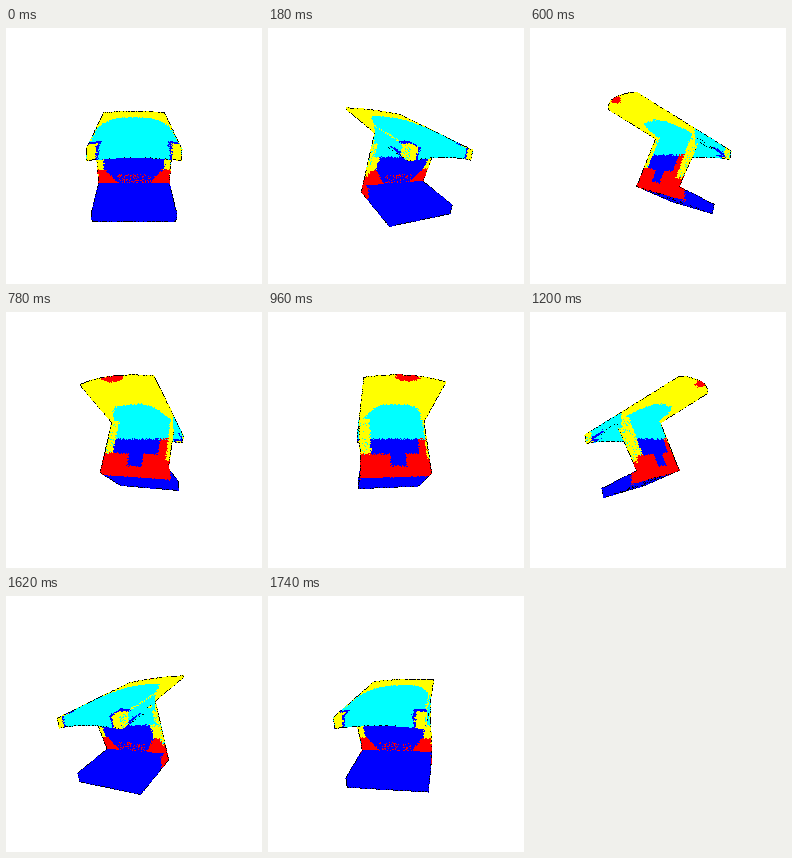
These frames come from a looping animation (256 px wide and 256 px high, 1.8 s). An HTML page with a canvas:

```html
<!DOCTYPE html>
<html lang="en">
<head>
<meta charset="utf-8">
<title>Rotating point cloud</title>
<style>
  html, body { margin: 0; width: 100%; height: 100%; overflow: hidden; background: #fff; }
  canvas { display: block; width: 256px; height: 256px; image-rendering: pixelated; }
</style>
</head>
<body>
<canvas id="stage" width="256" height="256"></canvas>
<script>
const SIZE = 256, MID = 128, FRAMES = 30, STEP_MS = 60;
const CAMERA = 240, HALF = 35, GRID = 0.55;
const rgb = (r, g, b) => (255 << 24 | b << 16 | g << 8 | r) >>> 0;
const WHITE = rgb(255, 255, 255), BLACK = rgb(0, 0, 0);
const YELLOW = rgb(255, 255, 0), CYAN = rgb(0, 255, 255);
const BLUE = rgb(0, 0, 255), RED = rgb(255, 0, 0);

let seed = 7;
function random() {
  seed = (seed * 1664525 + 1013904223) >>> 0;
  return seed / 4294967296;
}
const jitter = size => (random() - 0.5) * size;

// Side profile as [depth, height]; the shape is this profile swept across x.
const backTop = [-40, 50.5], frontTop = [65, 5], frontLow = [63, -3.5];
const stemFrontTop = [23, 13], stemFrontLow = [1, -27];
const footTop = [42, -46.5], footLow = [39.5, -55];
const heel = [-7, -33.5], stemBackTop = [18, 22], backLow = [-40, 49];

// Part colours for each surface.
function corner(x, u) {
  const ax = Math.abs(x);
  if (u > 57 && ax > 28) return YELLOW;
  if (u > 52 && ax > 26) return BLUE;
  return 0;
}
function topColor(x, u) {
  const dome = -16 + 20 * (x / 30) ** 4;
  return corner(x, u) || (u > dome && Math.abs(x) < 34 ? CYAN : YELLOW);
}
function underColor(x, u) {
  if ((x / 11) ** 2 + ((u + 43) / 7) ** 2 < 1) return RED;
  return u > -8 + 25 * (x / 31) ** 4 ? CYAN : YELLOW;
}
const lipColor = (x, u) => corner(x, u) || CYAN;
function stemFrontColor(x, u, v) {
  const ax = Math.abs(x);
  if (v > -1) return CYAN;
  if (v < -13 && ax > 16 + (v + 27) * 0.8) return RED;
  if (ax > 29) return YELLOW;
  return v < -18 && ax < 16 && random() < 0.25 ? RED : BLUE;
}
function stemBackColor(x, u, v) {
  if (x < -33 && v > -20) return YELLOW;
  if (v < -26 || (v < -14 && Math.abs(x + 2) > 8)) return RED;
  if (x > 25) return random() < 0.1 ? CYAN : YELLOW;
  if (v > 1) return CYAN;
  return x < -25 ? RED : BLUE;
}
const footTopColor = () => BLUE;
const footUnderColor = (x, u) => u < 0 ? RED : BLUE;
const footSideColor = (x, u) => u < 7 ? RED : BLUE;
function plateSideColor(x, u, v) {
  if (u < 18) return YELLOW;
  if (u > 55 && u < 64) return random() < 0.8 ? YELLOW : CYAN;
  const low = 22 - 0.41 * (u - 18) - 2.5;
  return u > 40 && v < low - 1.5 ? BLUE : CYAN;
}
function stemSideColor(x, u, v) {
  if (v < -19) return RED;
  if (v > 11 && u > 18) return CYAN;
  return random() < 0.12 ? CYAN : YELLOW;
}

const points = [];
const mix = (a, b, t) => [a[0] + (b[0] - a[0]) * t, a[1] + (b[1] - a[1]) * t];
const span = (a, b) => Math.hypot(a[0] - b[0], a[1] - b[1]);

function addPoint(x, u, v, colorAt) {
  const color = colorAt(x + jitter(2), u + jitter(2), v + jitter(2));
  const bulge = 1 - (x / HALF) ** 2;
  if (u < 0 && v > 25) {
    const reach = -u / 40 * bulge;
    u -= 5 * reach;
    v += 2.4 * reach;
  } else if (u > 25 && v > -5) {
    v += 2.5 * bulge * (u - 25) / 40;
  }
  points.push({ x, u, v, color });
}
function sweep(a, b, colorAt) {
  const rows = Math.ceil(span(a, b) / GRID), cols = Math.ceil(2 * HALF / GRID);
  for (let i = 0; i <= rows; i++) {
    const [u, v] = mix(a, b, i / rows);
    for (let j = 0; j <= cols; j++) addPoint(HALF * (2 * j / cols - 1), u, v, colorAt);
  }
}
function sides(a, b, c, d, colorAt) {
  const rows = Math.ceil(span(a, b) / GRID), cols = 22;
  for (let i = 0; i <= rows; i++) {
    const p = mix(a, b, i / rows), q = mix(c, d, i / rows);
    for (let j = 0; j <= cols; j++) {
      const [u, v] = mix(p, q, j / cols);
      addPoint(-HALF, u, v, colorAt);
      addPoint(HALF, u, v, colorAt);
    }
  }
}

sweep(backTop, frontTop, topColor);
sweep(frontTop, frontLow, lipColor);
sweep(frontLow, stemFrontTop, lipColor);
sweep(stemFrontTop, stemFrontLow, stemFrontColor);
sweep(stemFrontLow, footTop, footTopColor);
sweep(footTop, footLow, footTopColor);
sweep(footLow, heel, footUnderColor);
sweep(heel, stemBackTop, stemBackColor);
sweep(stemBackTop, backLow, underColor);
sweep(backLow, backTop, underColor);
sides(backTop, frontTop, backLow, frontLow, plateSideColor);
sides(stemBackTop, heel, stemFrontTop, stemFrontLow, stemSideColor);
sides(stemFrontLow, footTop, heel, footLow, footSideColor);

const context = document.getElementById("stage").getContext("2d");
const image = context.createImageData(SIZE, SIZE);
const pixels = new Uint32Array(image.data.buffer);
const depth = new Float32Array(SIZE * SIZE);
const EMPTY = -1000;

function hash(n) {
  const s = Math.sin(n * 12.9898) * 43758.5453;
  return s - Math.floor(s);
}

// Dotted black rim where the surface ends or jumps in depth.
function drawRim(frame) {
  const around = [1, -1, SIZE, -SIZE];
  for (let i = SIZE; i < SIZE * (SIZE - 1); i++) {
    if (depth[i] === EMPTY) continue;
    let jump = 0;
    for (const step of around) jump = Math.max(jump, depth[i] - depth[i + step]);
    const chance = jump > 300 ? 0.55 : jump > 12 ? 0.25 : 0;
    if (hash(i + frame * 977) < chance) pixels[i] = BLACK;
  }
}

function draw(frame) {
  const angle = frame / FRAMES * 2 * Math.PI;
  const cos = Math.cos(angle), sin = Math.sin(angle);
  pixels.fill(WHITE);
  depth.fill(EMPTY);
  for (const p of points) {
    const near = p.u * cos - p.x * sin;
    const scale = CAMERA / (CAMERA - near);
    const sx = Math.floor(MID + scale * (p.x * cos + p.u * sin));
    const sy = Math.floor(MID - scale * p.v);
    const i = sy * SIZE + sx;
    if (near > depth[i]) {
      depth[i] = near;
      pixels[i] = p.color;
    }
  }
  drawRim(frame);
  context.putImageData(image, 0, 0);
}

const start = performance.now();
let shown = -1;
function tick() {
  const frame = Math.floor((performance.now() - start) / STEP_MS) % FRAMES;
  if (frame !== shown) draw(shown = frame);
  requestAnimationFrame(tick);
}
tick();
</script>
</body>
</html>
```
